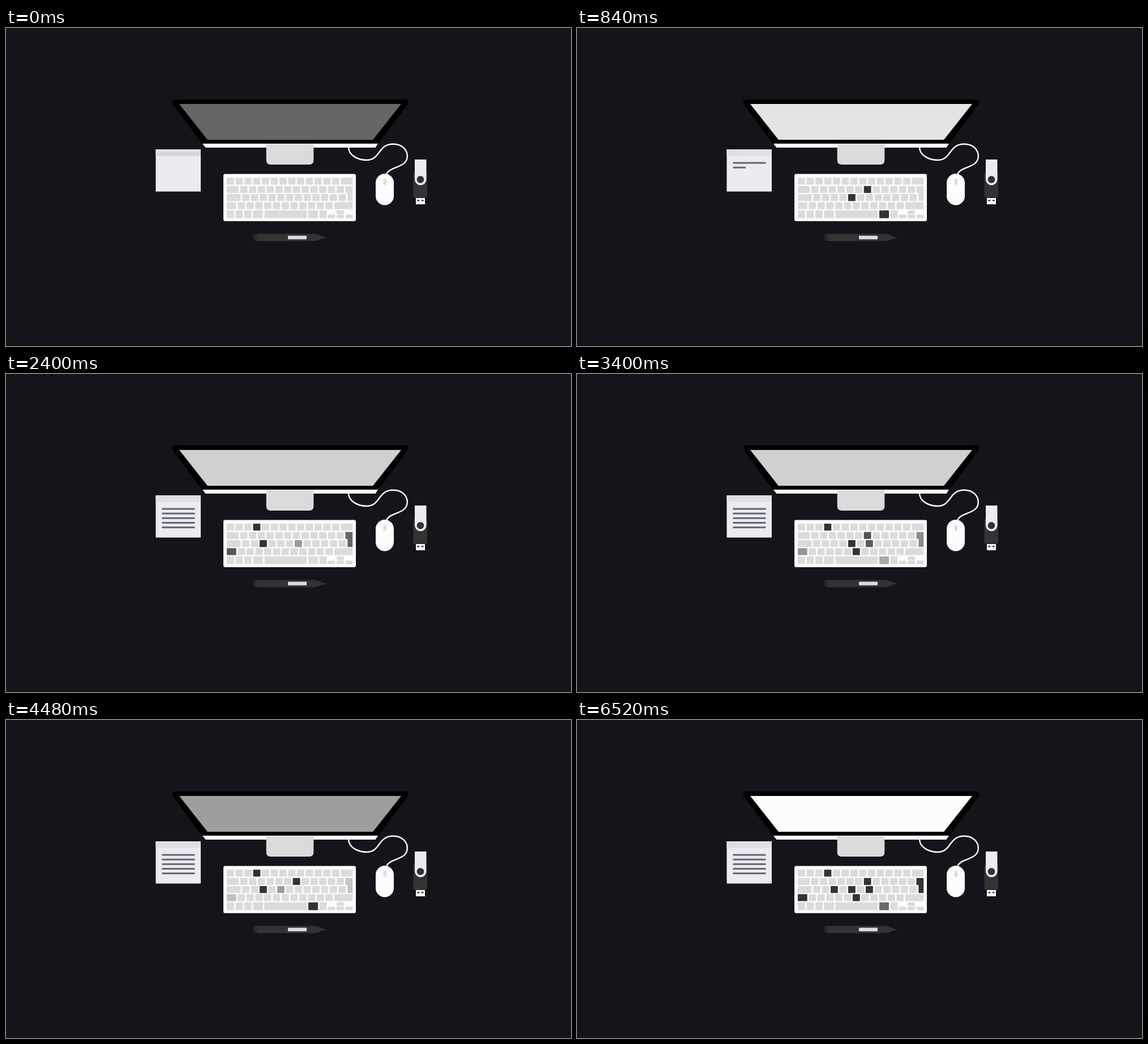
Animation of 998 by 561 pixels, one loop 6600 ms. Source, as an HTML page:

```html
<!DOCTYPE html>
<html lang="en">
<head>
<meta charset="utf-8">
<title>Desk</title>
<style>
html, body { margin: 0; width: 100%; height: 100%; overflow: hidden; background: #14151a; }
svg { display: block; width: 100vw; height: 100vh; }
</style>
</head>
<body>
<svg viewBox="0 0 998 561">
  <rect width="998" height="561" fill="#14151a"/>

  <g id="monitor">
    <path d="M300 126H704Q713 126 709 135L657 205H347L295 135Q291 126 300 126Z" fill="#000"/>
    <path id="screen" d="M306 134H698L648 197.3H356Z"/>
    <path d="M347 204H657L652.5 211H352.5Z" fill="#fff"/>
    <path d="M459.7 204.5H543.3V233Q543.3 241 535.3 241H467.7Q459.7 241 459.7 233Z" fill="#dbdbdb"/>
  </g>

  <g id="note">
    <rect x="264.5" y="214" width="79.5" height="74.5" fill="#ebebf1"/>
    <rect x="264.5" y="214" width="79.5" height="11.5" fill="#dddde2"/>
    <path id="fold" d="M264.5 225.5Q274 219 290 219H344V225.5Z"/>
    <g id="lines" fill="#62666e"></g>
  </g>

  <g id="keyboard">
    <rect x="384" y="257.5" width="234" height="83.3" rx="3" fill="#fcfcfc"/>
    <g id="keys" fill="#dbdbdb"></g>
  </g>

  <g id="mouse">
    <path d="M605 210C605 225 622 233 637 233C662 233 656 204.8 684 204.8C700 204.8 708.8 215 708.8 226C708.8 248 676 243 672 259"
          fill="none" stroke="#fff" stroke-width="2.4"/>
    <rect x="653" y="257" width="32" height="55.5" rx="16" fill="#fcfcfc"/>
    <rect x="666.5" y="266" width="5.5" height="11" rx="2.7" fill="#dedede"/>
  </g>

  <g id="stick">
    <rect x="719.5" y="255" width="24.5" height="44.5" rx="3" fill="#333"/>
    <path d="M722 232H742.5V267A10.25 10.25 0 0 1 722 267Z" fill="#ebebf1"/>
    <circle cx="732" cy="267.3" r="6.3" fill="#333"/>
    <rect x="724" y="300" width="16" height="11" fill="#fcfcfc"/>
    <path d="M726.5 303h3.5v2.6h-3.5zM734 303h3.5v2.6h-3.5z" fill="#333"/>
  </g>

  <g id="pen">
    <rect x="437" y="363" width="12" height="12.5" rx="3" fill="#2b2625"/>
    <path d="M558 367.8L565 369V371L558 371.6Z" fill="#4a2b1d"/>
    <path d="M443 363.3H545Q553 364.5 560 368.2V371.3Q553 375 545 376H443Z" fill="#333"/>
    <rect x="498" y="366.5" width="33" height="6.3" rx="1" fill="#dcdce1"/>
  </g>
</svg>
<script>
const LOOP = 6600, TICK = 40;
const TYPING = 480;       // typing and screen flicker begin
const FLICKER = 2420;     // one dip of the screen light
const FADE = 360;         // a key changes colour
const LEFT = 390, RIGHT = 612.2, PITCH = 15.5, GAP = 2.7;

const byId = id => document.getElementById(id);
const clamp = v => Math.min(1, Math.max(0, v));
const grey = v => `rgb(${[v, v, v].map(Math.round)})`;

function add(parent, tag, attrs) {
  const el = document.createElementNS("http://www.w3.org/2000/svg", tag);
  for (const name in attrs) el.setAttribute(name, attrs[name]);
  return parent.appendChild(el);
}

const addKey = (x, y, width, height = 12.2) =>
  add(byId("keys"), "rect", { x, y, width, height, rx: 0.8 });

// A wide first key, then equal keys at a fixed pitch
function addRow(y, firstWidth, count) {
  const start = LEFT + firstWidth + GAP;
  const keys = [addKey(LEFT, y, firstWidth)];
  for (let i = 0; i < count; i++) keys.push(addKey(start + PITCH * i, y, PITCH - GAP));
  return { keys, end: start + PITCH * count };
}

function addFilledRow(y, firstWidth, count) {
  const { keys, end } = addRow(y, firstWidth, count);
  addKey(end, y, RIGHT - end);
  return keys;
}

const digits = addFilledRow(264, 12.8, 12);
const upper = addRow(278.8, 21, 12).keys;
const home = addRow(293, 24.3, 12).keys;
const lower = addFilledRow(307.3, 16.7, 11);
const enter = add(byId("keys"), "path", { d: "M599.5 278.8H612.2V305.2H603.3V291H599.5Z" });

let x = LEFT;
const bottom = [12.8, 12.8, 12.8, 17.3, 74.8, 17, 12.8].map(width => {
  const key = addKey(x, 321.8, width, 13.8);
  x += width + GAP;
  return key;
});
for (let i = 0; i < 3; i++) addKey(568.5 + 15.6 * i, 329.2, 12.8, 6.4);
addKey(584.1, 321.8, 12.8, 6.4);

// Each key is pressed at a time, held, then released for as long
const pressed = (key, start, hold) => ({ key, start, hold });
const command = pressed(bottom[5], 495, 1490);
const typed = [
  pressed(digits[3], 1410, 5000),
  pressed(upper[7], 3290, 1850),
  pressed(home[3], 1370, 1400),
  pressed(home[5], 62, 1458),
  pressed(home[7], 1410, 950),
  pressed(enter, 1530, 940),
  pressed(lower[0], 1580, 925),
  pressed(lower[6], 1290, 930)
];

const lines = Array.from({ length: 5 }, (_, i) =>
  add(byId("lines"), "rect", { x: 275.5, y: 236.5 + 8.15 * i, width: 0, height: 3 }));

const fade = (t, middle) => clamp(0.5 + (t - middle) / FADE);

function pulse(t, { start, hold }) {
  const cycle = 2 * hold;
  const turns = (t - start - hold / 2) / cycle;
  const fromMiddle = Math.abs(turns - Math.round(turns)) * cycle;
  const level = clamp(0.5 + (hold / 2 - fromMiddle) / FADE);
  return Math.min(level, fade(t, TYPING + FADE / 2));
}

const paint = (key, darkness) => key.setAttribute("fill", grey(219 - 168 * darkness));

// Switches on, then dips smoothly twice
function screenLight(t) {
  if (t < TYPING) return 102 + 150 * clamp(t / 246);
  const dips = Math.min(2, (t - TYPING) / FLICKER);
  return 252 - 60 * (1 - Math.cos(2 * Math.PI * dips));
}

function draw(t) {
  byId("screen").setAttribute("fill", grey(screenLight(t)));
  byId("fold").setAttribute("fill", t < TYPING ? "#d2d4dc" : "#e0e0e7");
  paint(command.key, pulse(t, command));
  for (const press of typed) paint(press.key, Math.max(pulse(t, press), fade(t, 5480)));
  lines.forEach((line, i) => line.setAttribute("width", 58 * clamp((t - TYPING - 265 * i) / 245)));
}

function frame() {
  draw(Math.floor(performance.now() % LOOP / TICK) * TICK);
  requestAnimationFrame(frame);
}
frame();
</script>
</body>
</html>
```
